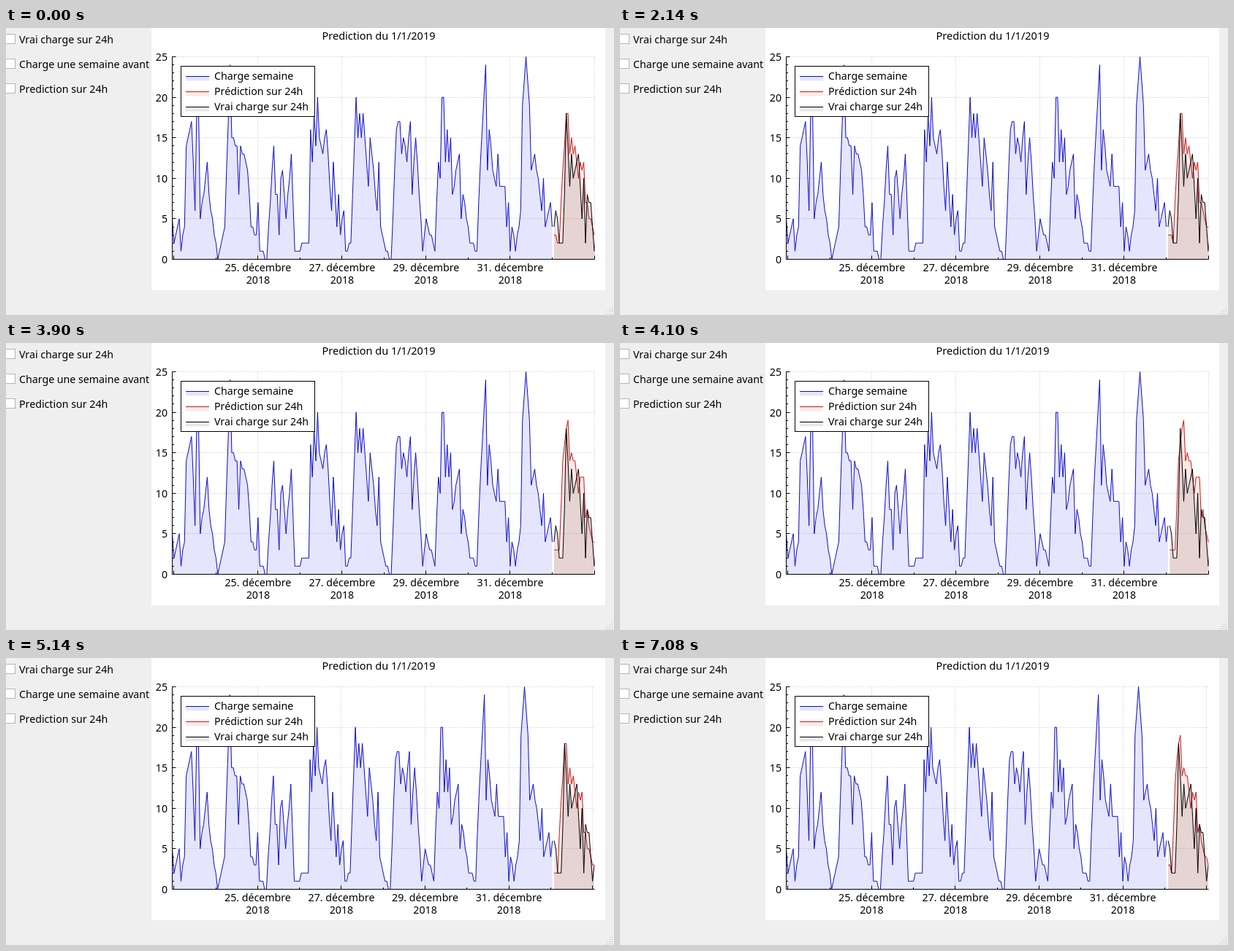
An HTML page with a canvas that plays this animation: 832x394 px, repeating every 8000 ms.

```html
<!DOCTYPE html>
<html lang="fr">
<head>
<meta charset="utf-8">
<style>
  html, body { margin: 0; height: 100%; overflow: hidden; background: #efefef; }
  canvas { display: block; }
</style>
</head>
<body>
<canvas id="stage" width="832" height="394"></canvas>
<script>
const ctx = document.getElementById('stage').getContext('2d');
const LOOP = 8000, LEFT = 227.5, RIGHT = 805.5, TOP = 39.5, BASE = 317.5;
const BLUE = ['#0c0ccb', 'rgba(0,0,240,.1)'];
const RED = ['#cc1818', 'rgba(235,40,20,.1)'];
const BLACK = ['#000', 'rgba(0,0,0,.09)'];

// Hourly load, one day per row after the first value; gaps are interpolated.
const week = fillGaps([5,
  2, , , 5, 1, , 4, 14, , , 17, , 6, 19, 19, 5, , 8, , 12, 8, , , ,
  , 0, , , , 4, , , 24, 15, , , 14, 8, 14, , , , 11, , 4, , , 3,
  7, 1, , , , 0, , , , 14, 8, 8, 3, 10, 11, , 5, , , 13, , 1, , ,
  , , , , , 2, 16, 12, 18, 14, 20, 15, , 13, , 16, , , 6, 12, , 4, 8, 3,
  , 6, 1, , , 2, , , 20, 15, 18, 15, 18, , , 9, 15, , , , 6, 12, 4, ,
  , 1, , , 0, , , 16, , 17, 13, 15, , 12, , 17, 8, , 15, , , , 1, ,
  5, , , , , 1, , 12, 10, 20, 20, 12, 16, 12, 15, 8, , , , 13, 5, 8, , ,
  , 2, , , , 1, , 12, , , 24, 11, 16, , 11, , 9, 13, 9, , , 9, 4, 7,
  1, 4, , 1, , , 6, 19, , 25, , 19, 11, , 13, , , , 6, 10, 4, , , 7, 4, 6]);

const actual = fillGaps([4, 6, 5, 2, , 2, 8, 18, , 9, 13, 10, , , 13, , 5, 10, 2, 8, 7, 7, , 1, 3]);
const low = fillGaps([3, 3, 2, 2, 7, , , 18, 18, 13, 15, 13, 14, 12, 10, 12, 11, 12, 7, 7, 5, 5, , 3]);
const high = fillGaps([3, , , 3, 8, 14, , 18, 19, 14, 15, 14, ...low.slice(12, 19), 8, 6, 5, 4, 4]);
const patch = (list, changes) => Object.assign([...list], changes);
const flat = patch(high, { 16: 12 });

// Each update: time, first predicted hour, last hour on the axis, prediction.
const updates = [
  [0, 217, 240, low],
  [700, 217, 240, patch(low, { 2: 3, 20: 6, 23: 4 })],
  [3100, 217, 240, high],
  [3900, 217, 240, flat],
  [4100, 218, 240, flat],
  [4300, 218, 241, [2, ...low.slice(2), 3]],
  [5700, 218, 241, [3, 3, 2, 7, 13, ...high.slice(6), 3]]
];

function fillGaps(list) {
  return Array.from(list, (v, i) => {
    if (v !== undefined) return v;
    let a = i, b = i;
    while (list[a] === undefined) a--;
    while (list[b] === undefined) b++;
    return Math.round(list[a] + (list[b] - list[a]) * (i - a) / (b - a));
  });
}

const yAt = v => BASE - v * (BASE - TOP) / 25;
const snap = v => Math.floor(v) + .5;

function line(x1, y1, x2, y2, color = '#000') {
  ctx.strokeStyle = color;
  ctx.beginPath();
  ctx.moveTo(x1, y1);
  ctx.lineTo(x2, y2);
  ctx.stroke();
}

function box(x, y, w, h, fill, stroke) {
  ctx.fillStyle = fill;
  ctx.fillRect(x, y, w, h);
  if (stroke) {
    ctx.strokeStyle = stroke;
    ctx.strokeRect(x, y, w, h);
  }
}

function text(str, x, y, align = 'left', size = 14.2) {
  ctx.font = size + 'px "Noto Sans", "Open Sans", sans-serif';
  ctx.textAlign = align;
  ctx.fillStyle = '#000';
  ctx.fillText(str, x, y);
}

function series(values, first, xAt, [stroke, fill]) {
  const curve = new Path2D();
  values.forEach((v, i) => curve.lineTo(xAt(first + i), yAt(v)));
  const area = new Path2D(curve);
  area.lineTo(xAt(first + values.length - 1), BASE);
  area.lineTo(xAt(first), BASE);
  ctx.fillStyle = fill;
  ctx.fill(area);
  ctx.strokeStyle = stroke;
  ctx.stroke(curve);
}

function drawPanel() {
  box(0, 0, 832, 394, '#efefef');
  ['Vrai charge sur 24h', 'Charge une semaine avant', 'Prediction sur 24h'].forEach((label, i) => {
    const y = 15.5 + i * 34;
    box(-1.5, y - 7, 14, 13, '#fff', '#b5b5b5');
    text(label, 18, y + 5.5);
  });
  for (let r = 0; r < 4; r++)
    for (let c = 0; c <= r; c++) box(829 - c * 3, 383 + r * 3, 1, 1, '#b0b0b0');
  box(199, 0, 621, 360, '#fff');
  text('Prediction du 1/1/2019', 510, 16, 'center', 14.5);
}

function drawLegend() {
  box(239.5, 52.5, 183, 69, '#fff', '#000');
  [['Charge semaine', BLUE], ['Prédiction sur 24h', RED], ['Vrai charge sur 24h', BLACK]].forEach(([label, [stroke, fill]], i) => {
    const y = 66.5 + i * 21;
    box(246, y, 32, 6, fill);
    line(246, y, 278, y, stroke);
    text(label, 285, y + 4.5);
  });
}

function drawChart(first, last, prediction) {
  const xAt = h => LEFT + (h + 1) * (RIGHT - LEFT - .5) / (last + 1);

  ctx.setLineDash([1, 2]);
  for (let v = 5; v <= 25; v += 5) line(LEFT, snap(yAt(v)), RIGHT, snap(yAt(v)), '#c4c4c4');
  for (let h = 0; h <= 240; h += 48) line(snap(xAt(h)), TOP, snap(xAt(h)), BASE, '#c4c4c4');
  ctx.setLineDash([]);

  ctx.save();
  ctx.beginPath();
  ctx.rect(LEFT, TOP - 1, RIGHT - LEFT, BASE - TOP + 2);
  ctx.clip();
  series(week.slice(0, first + 1), -1, xAt, BLUE);
  series(prediction, first, xAt, RED);
  series(actual.slice(first - 217), first, xAt, BLACK);
  ctx.restore();

  line(LEFT, TOP, LEFT, BASE);
  line(LEFT, BASE, RIGHT, BASE);
  for (let v = 0; v <= 25; v++) {
    const y = snap(yAt(v)), major = v % 5 === 0;
    line(LEFT, y, LEFT + (major ? 5 : 2.5), y);
    if (major) text(v, 221, y + 5, 'right');
  }
  for (let day = 0; day <= 10; day++) {
    const x = xAt(day * 24), major = day % 2 === 0;
    line(snap(x), BASE, snap(x), BASE - (major ? 5 : 2.5));
    if (major && day > 0 && day < 10) {
      text(`${23 + day}. décembre`, x, 334, 'center');
      text('2018', x, 351, 'center');
    }
  }
}

function frame(now) {
  const t = now % LOOP;
  const [, first, last, prediction] = updates.findLast(u => u[0] <= t);
  ctx.lineWidth = 1;
  drawPanel();
  drawChart(first, last, prediction);
  drawLegend();
  requestAnimationFrame(frame);
}
frame(0);
</script>
</body>
</html>
```
